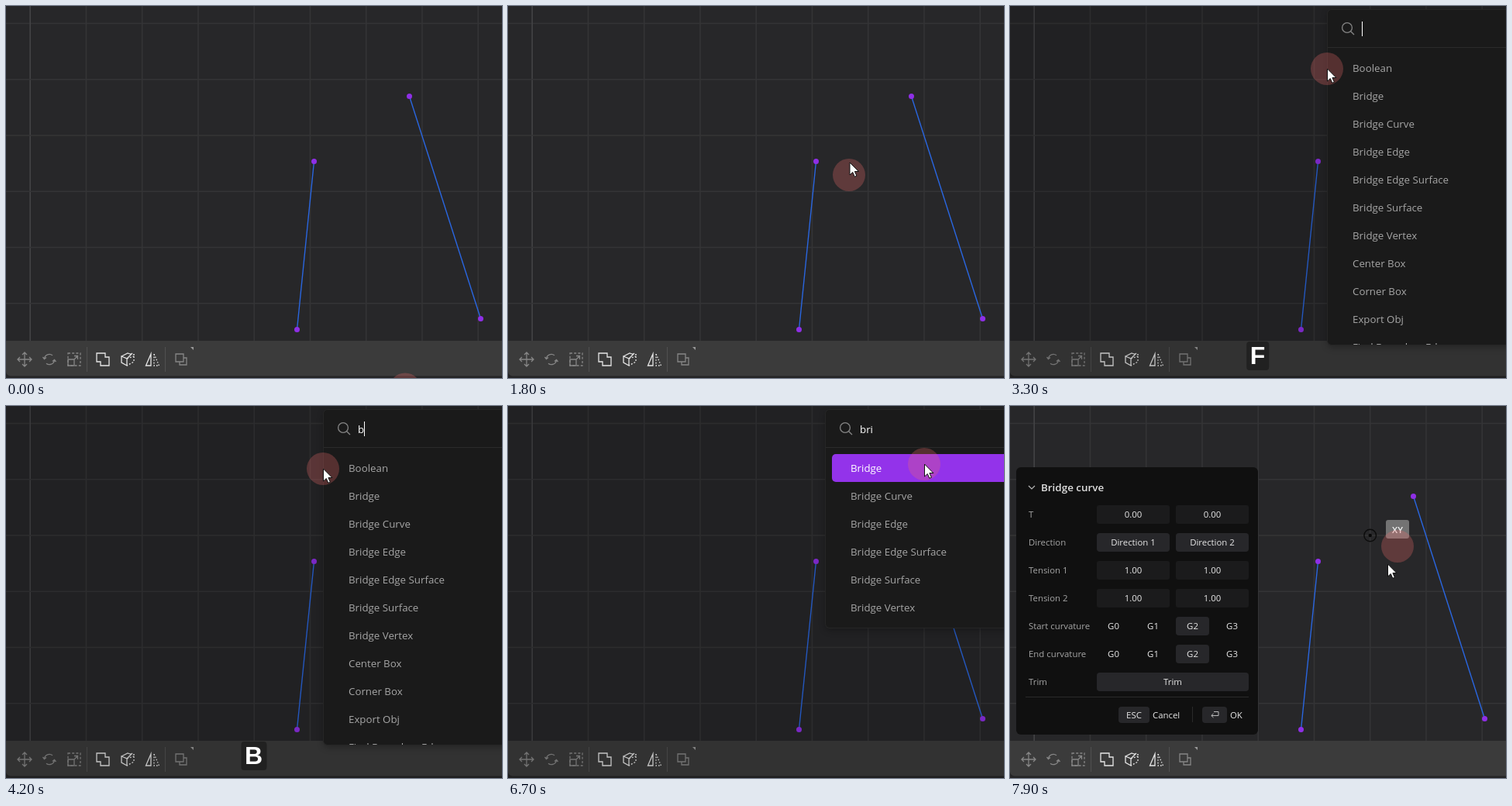
Write an HTML page with a canvas that moves like this. It is 640x480 px and loops after 8000 ms.

```html
<!DOCTYPE html>
<html lang="en">
<head>
<meta charset="utf-8">
<title>Bridge curve command</title>
<style>
html, body { margin: 0; width: 100%; height: 100%; overflow: hidden; background: #272729; }
#stage { position: relative; width: 640px; height: 480px; overflow: hidden;
  font: 11.4px "Open Sans", "Noto Sans", sans-serif; color: #a6a6a6; }
#stage div, canvas { position: absolute; box-sizing: border-box; white-space: pre; }
canvas { left: 0; top: 0; }
#dim { inset: 0; background: rgba(0, 0, 0, .15); }
#palette { left: 410px; top: 5px; width: 300px; background: #1a1a1a; border-radius: 5px;
  overflow: hidden; font-size: 13.3px; box-shadow: 0 0 0 1px #262626, 0 3px 10px rgba(0, 0, 0, .3); }
#palette svg { position: absolute; left: 17px; top: 15px; }
#query { left: 44px; top: 7px; line-height: 36px; color: #fff; font-weight: 500; }
#caret { top: 15px; width: 1px; height: 19px; background: #fff; }
#rule { left: 0; top: 48px; width: 300px; height: 1px; background: #2b2b2b; }
.row { left: 8px; width: 284px; height: 36px; padding-left: 24px; line-height: 36px; border-radius: 5px; }
.hot { background: #9333ea; color: #fff; }
#dialog { left: 8px; top: 79px; width: 312px; height: 345px; background: #101010; border-radius: 6px; }
#dialog svg { position: absolute; left: 0; top: 0; }
#title { left: 32px; top: 14px; line-height: 24px; font-size: 13.4px; font-weight: 600; color: #e0e0e0; }
.label { left: 16px; line-height: 24px; }
.box { height: 24px; line-height: 24px; text-align: center; border-radius: 4px; color: #e8e8e8; font-weight: 500; }
.field { background: #1b1b1c; border-radius: 3px; font-weight: 400; }
.btn { background: #27272a; }
.line { background: #2a2a2a; }
#keys { left: 319.5px; top: 433px; height: 37px; padding: 0 5px; line-height: 36px; transform: translateX(-50%);
  border-radius: 4px; background: #212121; color: #fff; font: bold 32px/36px "Liberation Sans", Arial, sans-serif; }
#plane { width: 30px; height: 24px; line-height: 25px; text-align: center; border-radius: 3px;
  background: #737373; color: #f2f2f2; font-weight: 600; }
</style>
</head>
<body>
<div id="stage">
  <canvas id="scene" width="640" height="480"></canvas>
  <div id="plane">XY</div>
  <div id="dim"></div>
  <div id="palette">
    <svg width="20" height="20" fill="none" stroke="#858585" stroke-width="1.3">
      <circle cx="8" cy="8" r="6.4"/><path d="M12.7 12.7L17 17"/>
    </svg>
    <div id="query"></div><div id="caret"></div><div id="rule"></div>
  </div>
  <div id="dialog">
    <svg width="312" height="345" fill="none" stroke="#b5b5b5" stroke-width="1.2">
      <path d="M16 24l4 4 4-4"/>
    </svg>
    <div id="title">Bridge curve</div>
  </div>
  <div id="keys"></div>
  <canvas id="pointer" width="640" height="480"></canvas>
</div>
<script>
const LOOP = 8000, STEP = 100, GRID = 72.25, GX = 31.2, GY = 22.5;
const $ = id => document.getElementById(id);
const scene = $('scene').getContext('2d');
const pointer = $('pointer').getContext('2d');

function add(parent, cls, text, x, y, w, h) {
  const el = document.createElement('div');
  el.className = cls;
  el.textContent = text;
  if (x !== null) el.style.left = x + 'px';
  el.style.top = y + 'px';
  if (w) el.style.width = w + 'px';
  if (h) el.style.height = h + 'px';
  parent.append(el);
  return el;
}

// Command palette
const commands = ['Boolean', 'Bridge', 'Bridge Curve', 'Bridge Edge', 'Bridge Edge Surface', 'Bridge Surface',
  'Bridge Vertex', 'Center Box', 'Corner Box', 'Export Obj', 'Find Boundary Edges'];
const rows = commands.map((name, i) => add($('palette'), 'row', name, null, 57 + 36 * i));

function showPalette(t, tip) {
  const query = t < 4200 ? '' : t < 4700 ? 'b' : t < 5100 ? 'br' : 'bri';
  const typed = [5100, 4700, 4200, 3200].find(k => t >= k);
  let n = 0;
  rows.forEach((row, i) => {
    const hit = query.length < 2 || commands[i].toLowerCase().includes(query);
    show(row, hit);
    if (hit) row.style.top = 57 + 36 * n++ + 'px';
  });
  $('palette').style.height = Math.min(432, 65 + 36 * n) + 'px';
  rows[1].classList.toggle('hot', t > 6100 && tip.x > 418);
  $('query').textContent = query;
  $('caret').style.left = 44 + Math.round([0, 8.2, 13.6, 16.5][query.length]) + 'px';
  show($('caret'), Math.floor((t - typed) / 500) % 2 === 0);
}

// Tool dialog
const dialog = $('dialog');
const settings = [
  ['T', 'field', '0.00', '0.00'],
  ['Direction', 'btn', 'Direction 1', 'Direction 2'],
  ['Tension 1', 'field', '1.00', '1.00'],
  ['Tension 2', 'field', '1.00', '1.00'],
  ['Start curvature', '', 'G0', 'G1', 'G2', 'G3'],
  ['End curvature', '', 'G0', 'G1', 'G2', 'G3'],
  ['Trim', 'btn', 'Trim']
];
settings.forEach(([name, cls, ...cells], r) => {
  const y = 48.5 + 36 * r, w = (204 - 8 * cells.length) / cells.length;
  add(dialog, 'label', name, null, y);
  cells.forEach((text, i) =>
    add(dialog, 'box ' + (text === 'G2' ? 'btn' : cls), text, 104 + i * (w + 8), Math.floor(y) + .5, w));
});
add(dialog, 'line', '', 12, 296, 288, 1);
add(dialog, 'box btn', 'ESC', 132, 309, 40, 21).style.lineHeight = '21px';
add(dialog, 'box', 'Cancel', 176, 307.5);
add(dialog, 'line', '', 227, 309, 1, 20);
add(dialog, 'box btn', '', 240, 309, 32, 21);
add(dialog, 'box', 'OK', 276, 307.5);
const enter = document.createElementNS('http://www.w3.org/2000/svg', 'svg');
enter.innerHTML = '<path d="M255 315.500h6v5h-9M254.500 318l-2.700 2.500 2.700 2.500" stroke-width="1"/>';
enter.setAttribute('width', 312);
enter.setAttribute('height', 345);
enter.setAttribute('fill', 'none');
enter.setAttribute('stroke', '#bbb');
dialog.append(enter);

// Viewport and toolbar
function stroke(c, path, color, width, dash = []) {
  c.strokeStyle = color;
  c.lineWidth = width;
  c.setLineDash(dash);
  c.stroke(new Path2D(path));
  c.setLineDash([]);
}

function dot(c, x, y, r, color) {
  c.fillStyle = color;
  c.beginPath();
  c.arc(x, y, r, 0, 2 * Math.PI);
  c.fill();
}

function icon(x, color, ...parts) {
  scene.save();
  scene.translate(x, 456);
  for (const [path, dash] of parts) stroke(scene, path, color, 1.3, dash);
  scene.restore();
}

function drawToolbar() {
  const c = scene, grey = '#868686', white = '#e6e6e6';
  c.fillStyle = '#242426';
  c.fillRect(0, 470, 640, 10);
  c.fillStyle = '#3b3b3b';
  c.beginPath();
  c.roundRect(0, 432, 650, 45.5, [0, 0, 0, 6]);
  c.fill();
  stroke(c, 'M104.5 440V472M205.5 440V472', '#505050', 1);
  icon(24, grey, ['M-9 0H9M0-9V9M-6-3l-3 3 3 3M6-3l3 3-3 3M-3-6l3-3 3 3M-3 6l3 3 3-3']);
  icon(56, grey, ['M-6.500 -1A6.500 6.500 0 0 1 4-5.200M6.500 1A6.500 6.500 0 0 1-4 5.200M-8.500-3l2 2.500 2.500-2M8.500 3l-2-2.500-2.500 2']);
  icon(88, grey, ['M-8-8H8V8H-8Z', [3, 2.2]], ['M-8 0H0V8H-8ZM0-4.500H4.500V0M4.500-4.500L0 0']);
  icon(125, white, ['M-8-8H3V-3H8V8H-3V3H-8Z']);
  icon(157, white, ['M-8-4L-1-1V8L-8 4ZM-8-4L0-8 3-7M-1-1L6-8'], ['M3-7L9-6M-1-1L8-4M8-4V3L-1 8', [2, 2]]);
  icon(189, white, ['M-2-7V8H-8.500Z'], ['M2-7V8H8.500Z', [1.6, 2]]);
  icon(226, grey, ['M-7-7H3V3H-7Z'], ['M-2 3V7H7V-2H3']);
  c.fillStyle = '#999';
  c.fill(new Path2D('M238 440H242V444Z'));
}

function drawScene(snap) {
  const c = scene;
  c.fillStyle = '#272729';
  c.fillRect(0, 0, 640, 480);
  for (let i = 0; i < 9; i++) {
    const x = GX + GRID * i, y = GY + GRID * i;
    stroke(c, `M0 ${y}H640`, '#343436', 1.6);
    stroke(c, `M${x} 0V480`, i ? '#343436' : '#434345', 1.6);
  }
  for (const [x1, y1, x2, y2] of [[397.5, 200.5, 375.5, 417.5], [520.5, 116.5, 612.5, 403.5]]) {
    stroke(c, `M${x1} ${y1}L${x2} ${y2}`, '#2a66e0', 1.4);
    dot(c, x1, y1, 3.5, '#8f2fe6');
    dot(c, x2, y2, 3.5, '#8f2fe6');
  }
  if (snap) {
    dot(c, snap.x, snap.y, 2.2, '#080808');
    c.strokeStyle = '#0c0c0c';
    c.lineWidth = 1.4;
    c.beginPath();
    c.arc(snap.x, snap.y, 7.8, 0, 2 * Math.PI);
    c.stroke();
  }
  drawToolbar();
}

// Pointer: time, x, y
const path = [[800, 515, 494.5], [1400, 440, 218], [1700, 440, 218], [1800, 440.5, 202], [2500, 409, 81],
  [6100, 409, 81], [6600, 537, 75], [7500, 537, 75], [7600, 533, 87], [7700, 518, 130],
  [7800, 500, 181], [7900, 487, 204]];
const eased = [800, 6100];

function tipAt(t) {
  let i = path.findIndex(p => p[0] > t);
  if (i === 0) return { x: path[0][1], y: path[0][2] };
  if (i < 0) i = path.length;
  const a = path[i - 1], b = path[i] || a;
  let k = b === a ? 0 : (t - a[0]) / (b[0] - a[0]);
  if (eased.includes(a[0])) k = k * k * (3 - 2 * k);
  return { x: a[1] + (b[1] - a[1]) * k, y: a[2] + (b[2] - a[2]) * k };
}

function drawPointer(tip, halo) {
  const c = pointer;
  c.clearRect(0, 0, 640, 480);
  dot(c, halo.x, halo.y, 21, 'rgba(240, 110, 110, .28)');
  c.save();
  c.translate(tip.x + .5, tip.y);
  const arrow = 'M0 0V16L3.800 12.500 6.300 18.300 8.900 17.200 6.400 11.500H11.400Z';
  c.fillStyle = '#fff';
  c.fill(new Path2D(arrow));
  stroke(c, arrow, '#111', 1);
  c.restore();
}

function show(el, on) { el.style.display = on ? 'block' : 'none'; }

function snapTo(p) {
  return {
    x: GX + GRID * Math.round((p.x - GX) / GRID),
    y: GY + GRID * Math.round((p.y - GY) / GRID)
  };
}

function render(t) {
  const tip = tipAt(t), halo = tipAt(t - STEP);
  const open = t >= 3200 && t < 7100;
  const snap = t >= 7600 ? snapTo(halo) : null;
  drawScene(snap);
  drawPointer(tip, halo);
  show($('dim'), open);
  show($('palette'), open);
  if (open) showPalette(t, tip);
  show(dialog, t >= 7200);
  show($('keys'), t >= 3200 && t < 6100);
  $('keys').textContent = t < 4200 ? 'F' : t < 4700 ? 'B' : t < 5100 ? 'BR' : 'BRI';
  show($('plane'), snap);
  if (snap) {
    $('plane').style.left = Math.round(snap.x + 19.8) + 'px';
    $('plane').style.top = Math.round(snap.y - 20) + 'px';
  }
}

const start = performance.now();
let last = -1;
function tick() {
  const t = Math.floor((performance.now() - start) % LOOP / STEP) * STEP;
  if (t !== last) render(last = t);
  requestAnimationFrame(tick);
}
tick();
</script>
</body>
</html>
```
